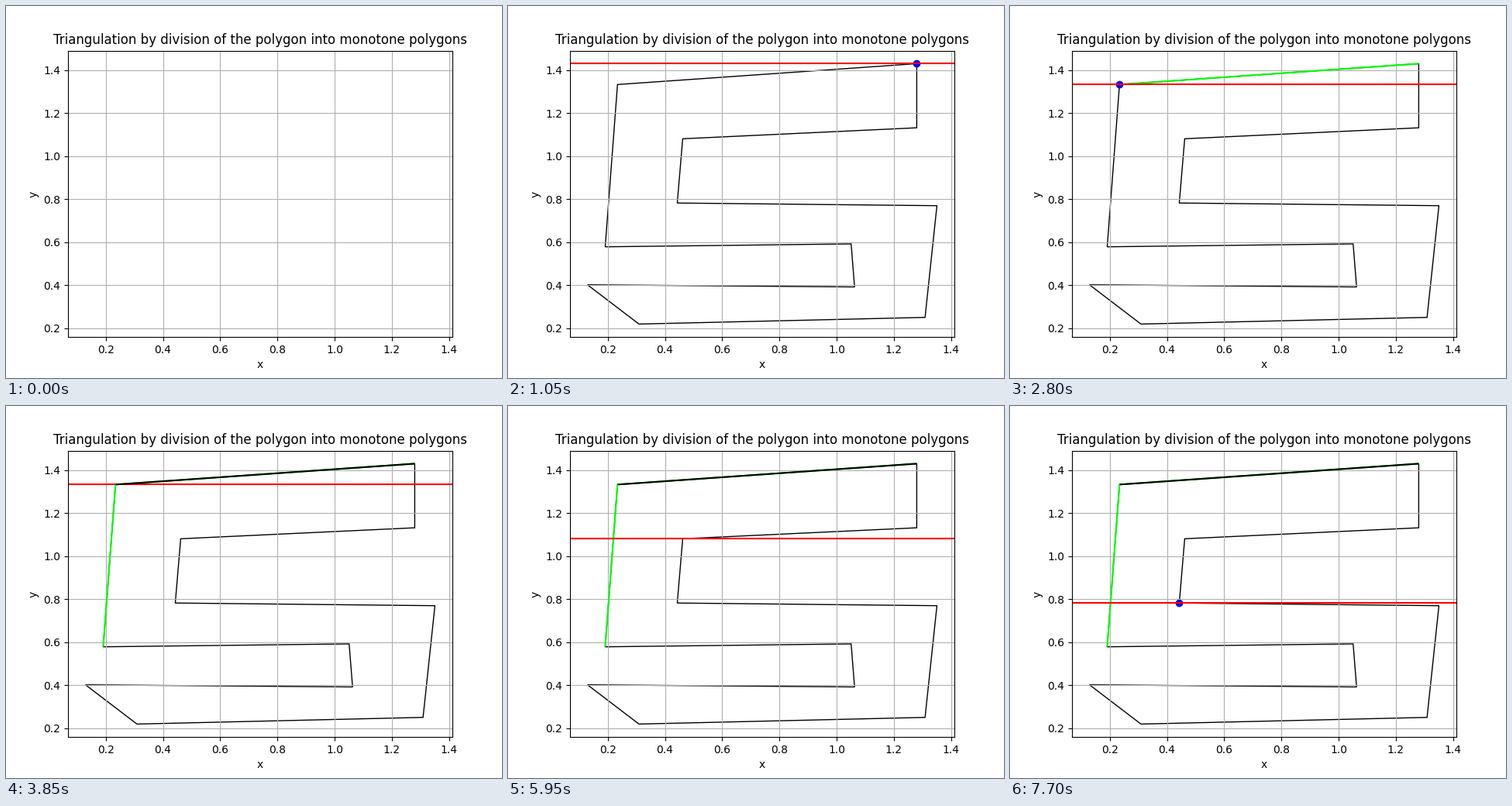
These frames come from a looping animation (640 px wide and 480 px high, 8 s). A matplotlib script:

```python
import matplotlib.pyplot as plt
from matplotlib.animation import FuncAnimation
from matplotlib.patches import Polygon

INTERVAL = 50      # ms per frame
FRAMES = 160       # 8 s loop
HOLD = 7           # frames per step (350 ms)
MARGIN = 0.05

# Polygon corners, counterclockwise
CORNERS = [
    (1.2804, 1.43), (0.234, 1.333), (0.191, 0.579), (1.051, 0.5925),
    (1.063, 0.3925), (0.129, 0.4025), (0.309, 0.22), (1.3095, 0.251),
    (1.351, 0.770), (0.443, 0.7825), (0.462, 1.081), (1.2804, 1.132),
]
N = len(CORNERS)


def padded(values):
    lo, hi = min(values), max(values)
    pad = MARGIN * (hi - lo)
    return lo - pad, hi + pad


fig, ax = plt.subplots(figsize=(6.4, 4.8), dpi=100)
ax.set_title("Triangulation by division of the polygon into monotone polygons")
ax.set_xlabel("x")
ax.set_ylabel("y")
xs, ys = zip(*CORNERS)
ax.set_xlim(padded(xs))
ax.set_ylim(padded(ys))
ax.grid(True)

outline = ax.add_patch(Polygon(CORNERS, fill=False, ec="black", lw=1))
spans = [[outline, 1, FRAMES]]  # artist, first step, step when it is gone


def show(artist, start):
    span = [artist, start, FRAMES]
    spans.append(span)
    return span


def edge(k, color, start):
    """Mark the edge from corner k to the next one."""
    a, b = CORNERS[k % N], CORNERS[(k + 1) % N]
    line, = ax.plot(*zip(a, b), color=color, lw=1.5, solid_capstyle="butt")
    show(line, start)


# Sweep down the corners: an edge turns green where the sweep
# meets its top end and black again at its bottom end.
step = 2
for k in sorted(range(N), key=lambda i: -ys[i]):
    if step * HOLD >= FRAMES:
        break
    line = show(ax.axhline(ys[k], color="red", lw=1.5), step)
    dot = show(ax.scatter(xs[k], ys[k], color="blue"), step + 1)
    step += 2
    if ys[k - 1] > ys[k]:
        edge(k - 1, "black", step)
        step += 1
    if ys[(k + 1) % N] < ys[k]:
        edge(k, "lime", step)
        step += 1
    dot[2], line[2] = step, step + 1
    step += 2


def update(frame):
    now = frame // HOLD
    for artist, start, stop in spans:
        artist.set_visible(start <= now < stop)
    return [span[0] for span in spans]


anim = FuncAnimation(fig, update, frames=FRAMES, interval=INTERVAL,
                     repeat=True, repeat_delay=0, blit=False)
plt.show()
```
